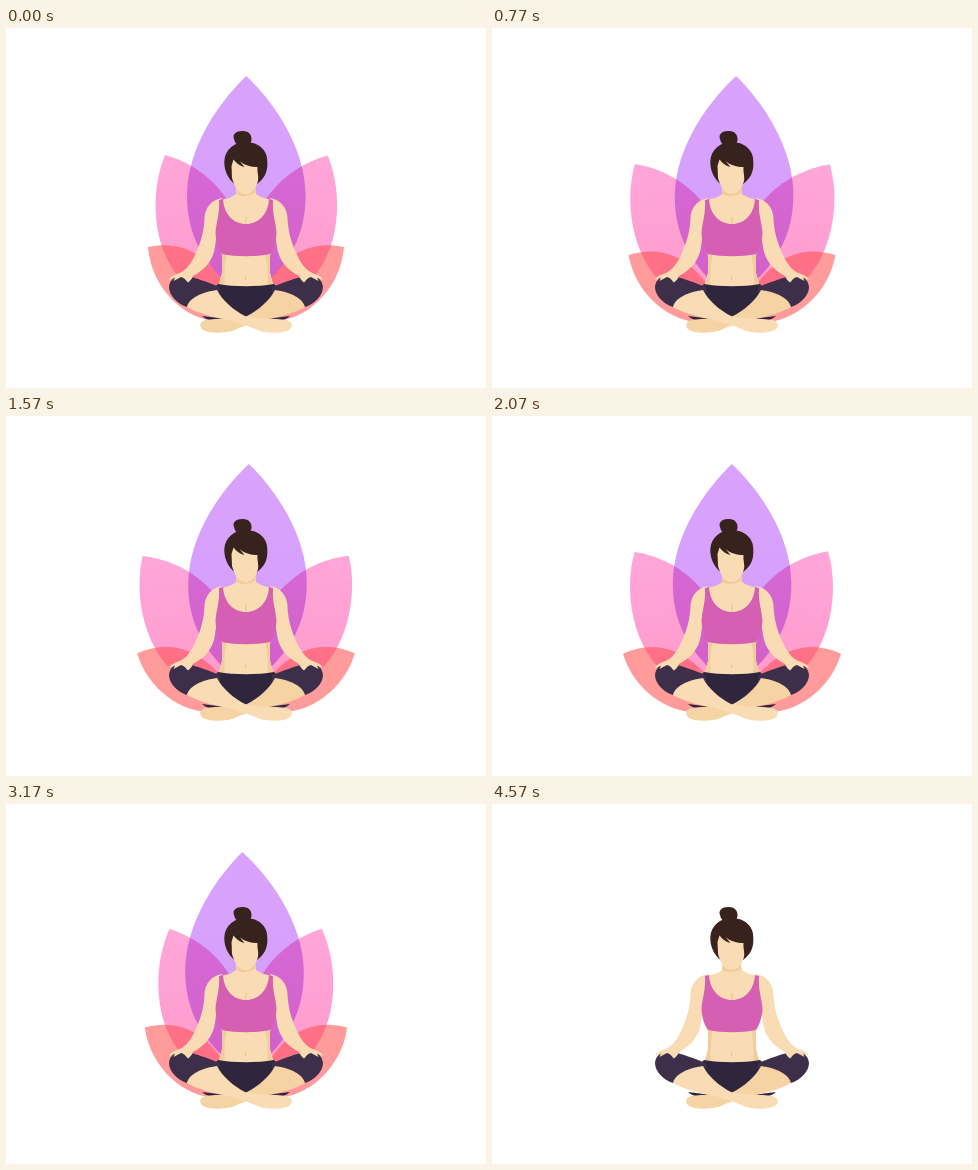
An HTML page that plays this animation: 480 px wide and 360 px high, repeating every 5 s.

```html
<!DOCTYPE html>
<html lang="en">
<head>
<meta charset="utf-8">
<title>Lotus pose</title>
<style>
  html, body { margin: 0; width: 100%; height: 100%; overflow: hidden; background: #fff; }
  svg { display: block; width: 100%; height: 100%; }
  #mid { mix-blend-mode: multiply; }
  .red { fill: #ff5050; fill-opacity: .57; }
  .skin { fill: #f9dcb3; }
  .back { fill: #f5d3a3; }
  .shade { fill: #f0cd9d; }
  .hair { fill: #38221e; }
  .top { fill: #d45fb3; }
  .pants { fill: #2f253d; }
  .knee { fill: #3d2f4a; }
</style>
</head>
<body>
<svg viewBox="0 0 480 360">
  <defs>
    <linearGradient id="violet" x1="0" y1="0" x2="0" y2="1">
      <stop offset="0" stop-color="#d9a3fd"/>
      <stop offset="1" stop-color="#d29dfa"/>
    </linearGradient>
    <linearGradient id="rose" x1="0" y1="0" x2="0" y2="1">
      <stop offset="0" stop-color="#ffa6d9"/>
      <stop offset="1" stop-color="#ff9acb"/>
    </linearGradient>
    <path id="side" d="M158.800 127.200C143 165 145 224 179 256Q208 276 236 272C252 228 233 148 158.800 127.200Z"/>
    <path id="low" d="M142 219C180 211 211 230 230 282L226 290C195 303 146 270 142 219Z"/>
    <path id="calf" d="M181 279C183 270 196 264 211 262C216 272 227 282 240 288.500C252 291 268 290 281 292C287 294 287 299 283 302C275 306 262 305 254 303C245 299 234 295 222 292C206 289 192 285 181 279Z"/>
    <g id="thigh">
      <path class="knee" d="M163 259C164 251 170 247 177 248C190 249 203 255 214 259V266L181 279C172 276 163 268 163 259Z"/>
      <path class="pants" d="M196 288L220 291L208 293Q200 292 196 288Z"/>
    </g>
    <path id="arm" class="skin" d="M216 170C205 172 199 180 198.500 190C198 205 194 216 189 227C184 238 178 244 171 246C166 248 163 250 163.500 252L169 249.500L167.500 253L175 249C179 250 180 253 182 254.500C184 253 186 251 187 248C200 241 207 232 209 219C210 207 214 203 214 195Z"/>
  </defs>
  <rect width="480" height="360" fill="#fff"/>

  <use id="pinkL" href="#side" fill="url(#rose)"/>
  <g transform="matrix(-1 0 0 1 480 0)"><use id="pinkR" href="#side" fill="url(#rose)"/></g>
  <path id="mid" fill="url(#violet)" d="M240.300 48C215 72 181 118 181 168C181 215 205 245 240.300 272C276 245 299.600 215 299.600 168C299.600 118 266 72 240.300 48Z"/>
  <use id="redL" class="red" href="#low"/>
  <g transform="matrix(-1 0 0 1 480 0)"><use id="redR" class="red" href="#low"/></g>

  <path class="skin" d="M230 155H249L250 166C256 171 264 170 268 174V205L264 228V245L268 260H212L216 245V228L212 205V174C216 170 226 171 230 166Z"/>
  <path class="shade" d="M231 160Q239 171 249 160V165Q239 171 230 166Z"/>
  <path class="shade" d="M216 226H221Q217 242 219 259H212L216 245ZM264 226H259Q263 242 261 259H268L264 245Z"/>
  <path d="M240 189V196M239.500 249V252" stroke="#e8c08e" fill="none"/>

  <path class="pants" d="M212 256C228 259 252 259 268 256L275 263L262 284L240 293L218 284L205 263Z"/>
  <use href="#thigh"/>
  <use href="#thigh" transform="matrix(-1 0 0 1 480 0)"/>
  <use class="back" href="#calf" transform="matrix(-1 0 0 1 480 0)"/>
  <use class="skin" href="#calf"/>
  <use href="#arm"/>
  <use href="#arm" transform="matrix(-1 0 0 1 480 0)"/>
  <path class="top" d="M213 172C214 185 210 195 209.500 205C210 215 213 222 216 226C230 229 250 229 264 226C267 222 270 214 270.500 205C270 195 266 186 267 172L263 171C262 187 252 196 240 196C228 196 218 187 217 171Z"/>

  <path class="hair" d="M228 111C226 106 231 102.500 237 103C243 103 246 107 245.500 112C245 116 241 118 237 118C232 118 229 116 228 111Z"/>
  <path class="hair" d="M229.500 157C221 150 218 141 218.300 133C219 121 229 114 240 114C253 114 262 123 261.300 134C262 144 258 151 251 156Z"/>
  <path class="skin" d="M225.500 138L227.500 131.500C230 135 234 138 238.500 139L233.500 133C238 137 245 139 251.500 139C251 144 253 149 252 153C250 160 246 166 239.500 166C232 166 228 157 226 150Z"/>
</svg>
<script>
  const LOOP = 5000, SWAY = 4000, FADE = 500;

  // px, py: pivot; deg + amp * cos: angle; peak: time of widest swing; out: fade start
  const petals = [
    { id: 'mid',   px: 240.3, py: 272, deg: 0,    amp: 1.05, peak: 1000, out: 3630 },
    { id: 'pinkR', px: 228,   py: 272, deg: -3.4, amp: -5.8, peak: 1370, out: 3740 },
    { id: 'pinkL', px: 228,   py: 272, deg: -3.5, amp: -5.8, peak: 1430, out: 3770 },
    { id: 'redR',  px: 224,   py: 280, deg: -6.2, amp: -6.4, peak: 1850, out: 3850 },
    { id: 'redL',  px: 224,   py: 280, deg: -6.2, amp: -6.4, peak: 1850, out: 3980 }
  ].map(p => ({ ...p, el: document.getElementById(p.id) }));

  function draw(t) {
    for (const { el, px, py, deg, amp, peak, out } of petals) {
      const angle = deg + amp * Math.cos(2 * Math.PI * (t - peak) / SWAY);
      el.setAttribute('transform', `rotate(${angle} ${px} ${py})`);
      el.style.opacity = Math.min(1, Math.max(0, 1 - (t - out) / FADE));
    }
  }

  const start = performance.now();
  function tick() {
    draw((performance.now() - start) % LOOP);
    requestAnimationFrame(tick);
  }
  tick();
</script>
</body>
</html>
```
